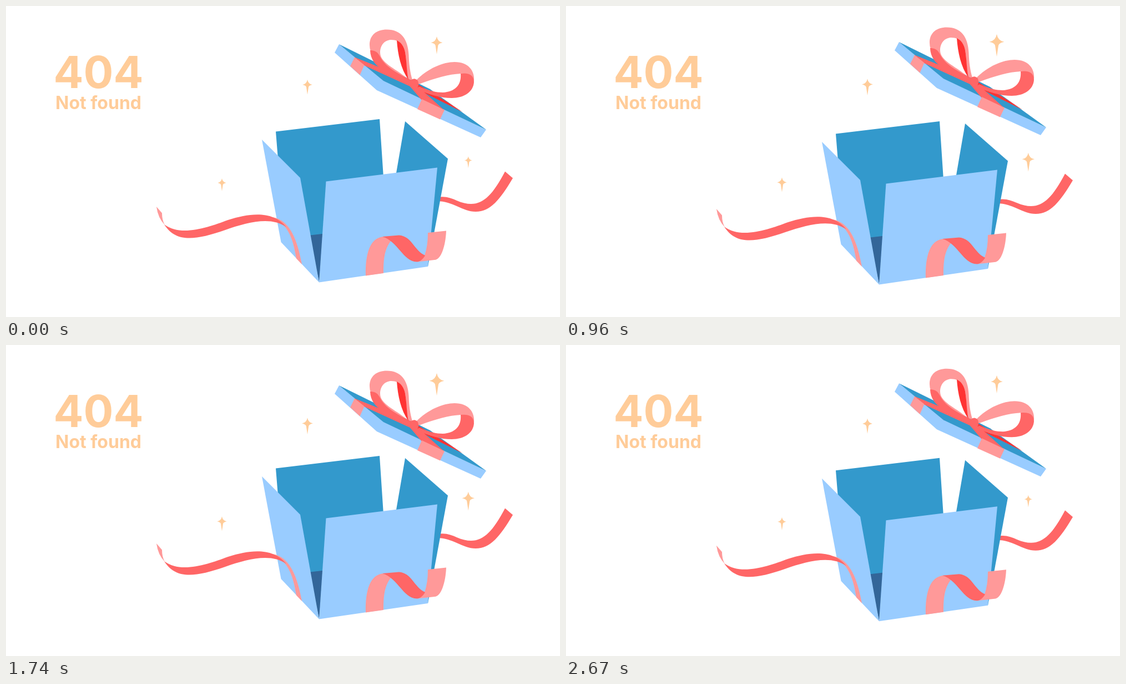
These frames come from a looping animation (998 px wide and 561 px high, 2700 ms). An HTML page with a canvas:

```html
<!DOCTYPE html>
<html lang="en">
<head>
<meta charset="utf-8">
<title>404 Not found</title>
<style>
  html, body { margin: 0; width: 100%; height: 100%; overflow: hidden; background: #fff; }
  canvas { display: block; }
</style>
</head>
<body>
<canvas id="stage" width="998" height="561"></canvas>
<script>
const ctx = document.getElementById('stage').getContext('2d');
const LOOP = 2700, STEP = 30, QUARTER = LOOP / 4, DRIFT = 7;
const PEACH = '#ffcc99', SKY = '#99ccff', BLUE = '#3399cc', NAVY = '#336699';
const PINK = '#ff9999', CORAL = '#ff6666', RED = '#ff3333';

const shape = (color, d) => ({ color, path: new Path2D(d) });

const box = [
  // trailing ribbon on the right, behind the box
  shape(CORAL, 'M776 346 C790 342 800 346 812 351 C850 367 871 352 899 298.5 L913 310.5 C890 349 873 371 846 371 C822 371 806 352 776 352Z'),
  // inside walls and floor
  shape(BLUE, 'M486 226.5 L673 204 L686 400 L572 412 L548 415 L500 400Z'),
  shape(BLUE, 'M719 208 L796 275.5 L760 470 L686 400Z'),
  shape(NAVY, 'M546 413.8 L574 410.5 L564 498.5Z'),
  // outside walls
  shape(SKY, 'M461 241 L530 310 L564 498.5 L495.5 426Z'),
  shape(SKY, 'M576.5 316.5 L777 291.5 L760 470 L564 498.5Z'),
  // ribbon on the left
  shape(PINK, 'M480 381 C512 386 525 423 533 466 L523 455.5 C518 425 512 408 498 393Z'),
  shape(CORAL, 'M285 394 C315 417 365 399 400 386 C440 373 482 369 505 399 C478 379 435 390 395 404 C340 423 306 427 285 394Z'),
  shape(PINK, 'M271 362 L281 373.5 Q281 386 286 395 Q274 383 271 362Z'),
  // ribbon on the front
  shape(PINK, 'M648 486.5 C647 446 656 417 681 416 L694 423 C682 438 680 455 680 482Z'),
  shape(PINK, 'M760 409 L793 405.5 C792 432 784 458 772 458 L741 461.5 L754 450 Q760 433 760 409Z'),
  shape(CORAL, 'M678 416 L708 413.5 C731 415 735 441 755 450 C751 457 746 461 740 461.5 C715 461 706 424 678 416Z')
];

const lid = [
  shape(SKY, 'M600 69 L592 84 L668 152 L855 237 L865 223 L680 134Z'),
  shape(BLUE, 'M600 69 L764 150 L865 223 L680 135Z'),
  // crossing bands
  shape(RED, 'M661 99 L697 117 L744 147 L724 137Z'),
  shape(RED, 'M735 137 L798 175 L822 191 L740 150Z'),
  shape(CORAL, 'M627 92 L645 107 L730 146 L736 136Z'),
  shape(CORAL, 'M727 144 L749 170 L790 188.5 L744 147Z'),
  shape(PINK, 'M628 92.5 L620 108.5 L637.5 124.5 L645.5 106.5Z'),
  shape(PINK, 'M749 168 L741 186 L782 204.5 L790 187.5Z'),
  // left loop
  shape(PINK, 'M728 133 C700 122 655 104 655 70 C655 52 668 42.5 686 42.5 C712 42.5 724 60 725.5 88 C726 105 728 120 732 133Z M721 129 C700 112 674 102 674 84 C674 70 683 61 694 61 C711 61 719 74 720 90 C721.5 105 721 118 724 130Z'),
  shape(CORAL, 'M656 80 C663 80 669 82 673 90 C682 108 700 119 730 134 L728 138 C690 122 657 112 656 80Z'),
  shape(RED, 'M704 62 C715 67 719 78 720 90 C722 105 722 120 725 133 C711 113 706 88 704 62Z'),
  // right loop
  shape(PINK, 'M738 135 C760 112 788 101 808 101 C833 101 845 117 843 136 C840 126 832 121 819 122 C798 123 773 130 744 141Z'),
  shape(CORAL, 'M819 122 C835 120 843 126 843 137 C842 155 825 166 803 166 C783 166 763 160 740 150 L744 145 C763 153 775 156 787 156 C808 155 821 143 819 122Z'),
  shape(CORAL, 'M729 134 Q736 128 742 135 Q745 143 740 149 Q732 152 728 145Z')
];

const starPath = new Path2D('M0 -16 Q1.7 -6.5 10.5 -5 Q3.2 -3.5 2.4 0 L0 16 L-2.4 0 Q-3.2 -3.5 -10.5 -5 Q-1.7 -6.5 0 -16Z');

// heights at the loop start, at both peaks and at the middle
const stars = [
  { x: 776, y: 71, start: 32, peak: 47, middle: 32 },
  { x: 543, y: 146.2, start: 27, peak: 35.2, middle: 23 },
  { x: 389, y: 322.5, start: 23, peak: 32.2, middle: 18.7 },
  { x: 832.8, y: 281.7, start: 21, peak: 40, middle: 26 }
];

const mix = (a, b, k) => a + (b - a) * k;

// linear passage through values spaced a quarter loop apart
function track(values, t) {
  const i = Math.floor(t / QUARTER);
  return mix(values[i], values[i + 1], t / QUARTER - i);
}

function drawGroup(shapes, dy) {
  ctx.save();
  ctx.translate(0, dy);
  for (const { color, path } of shapes) {
    ctx.fillStyle = color;
    ctx.fill(path, 'evenodd');
  }
  ctx.restore();
}

function drawStar({ x, y, start, peak, middle }, t) {
  const scale = track([start, peak, middle, peak, start], t) / 32;
  ctx.save();
  ctx.translate(x, y);
  ctx.scale(scale, scale);
  ctx.fill(starPath);
  ctx.restore();
}

function drawText(text, size, baseline) {
  ctx.font = `bold ${size}px Inter, sans-serif`;
  ctx.fillText(text, 166.5, baseline);
}

function draw(t) {
  ctx.fillStyle = '#fff';
  ctx.fillRect(0, 0, 998, 561);
  const drift = track([0, DRIFT, 0, -DRIFT, 0], t);
  drawGroup(box, drift);
  drawGroup(lid, -drift);
  ctx.fillStyle = PEACH;
  ctx.textAlign = 'center';
  drawText('404', 80, 148);
  drawText('Not found', 32, 185.5);
  stars.forEach(star => drawStar(star, t));
}

const origin = performance.now();
function tick() {
  const elapsed = (performance.now() - origin) % LOOP;
  draw(Math.floor(elapsed / STEP) * STEP);
  requestAnimationFrame(tick);
}
tick();
</script>
</body>
</html>
```
